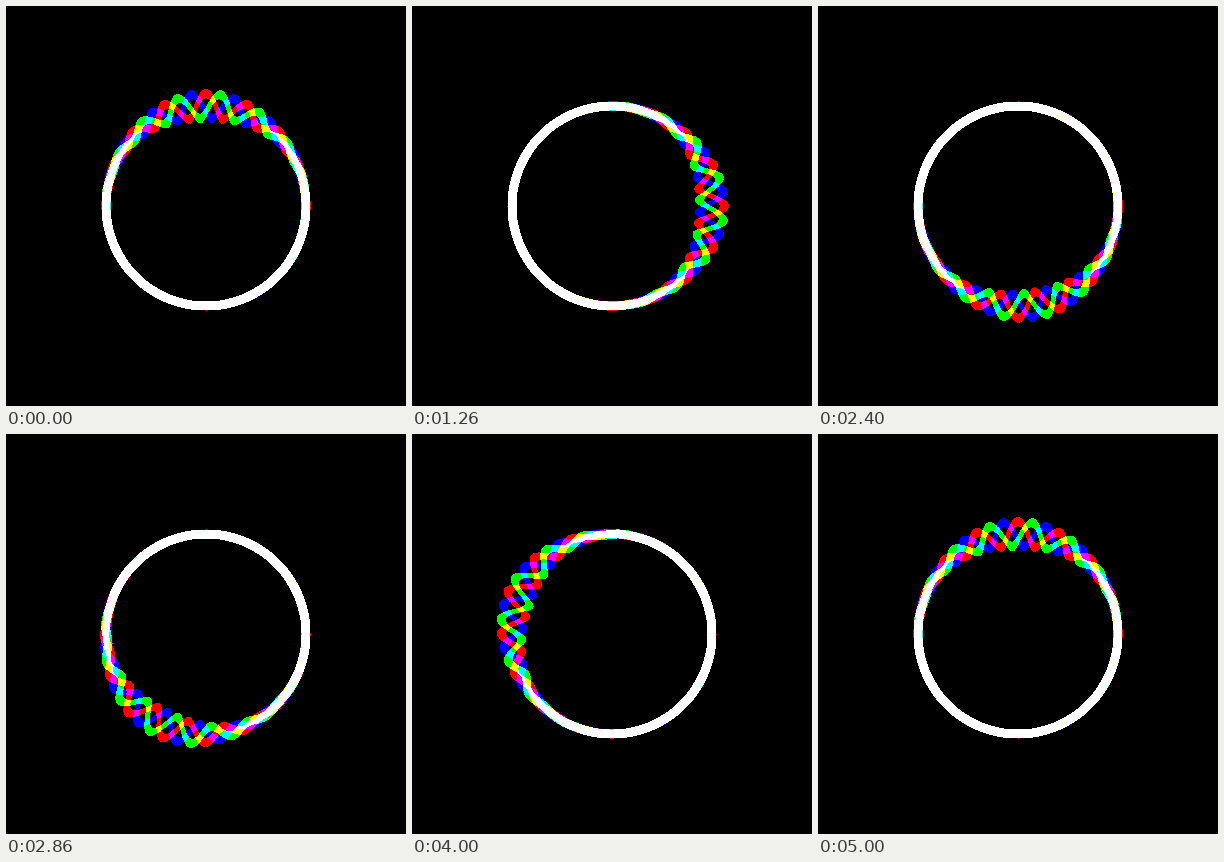
Animation of 400x400 px, one loop 5020 ms. Source, as an HTML page with a canvas:

```html
<!DOCTYPE html>
<html lang="en">
<head>
<meta charset="utf-8">
<title>Braided ring</title>
<style>
  html, body { margin: 0; width: 100%; height: 100%; overflow: hidden; background: #000; }
  canvas { display: block; width: 400px; height: 400px; }
</style>
</head>
<body>
<canvas id="stage" width="400" height="400"></canvas>
<script>
const SIZE = 400, MID = 200;
const ctx = document.getElementById('stage').getContext('2d');
const img = ctx.createImageData(SIZE, SIZE);
const px = new Uint32Array(img.data.buffer);

const TAU = Math.PI * 2;
const STEP = 20, STEPS = 251;
const RADIUS = 100, HALF = 4, GRAIN = 0.5;
const SWING = 12.5, TIGHT = 1.87;
const WAVES = 16, RAYS = 2400;
const BLACK = 0xff000000;
const CHANNELS = [0x0000ff, 0x00ff00, 0xff0000]; // red, green, blue in ABGR order

// Strength of the ripple at an angle away from its centre
function ripple(angle) {
  const d = Math.atan2(Math.sin(angle), Math.cos(angle));
  return SWING * Math.exp(-TIGHT * d * d);
}

// Light one channel along a ray, from the inner to the outer edge of the band
function ray(sin, cos, r, channel) {
  for (let w = -HALF; w <= HALF; w += GRAIN) {
    const x = Math.floor(MID + (r + w) * sin);
    const y = Math.floor(MID - (r + w) * cos);
    px[y * SIZE + x] |= channel;
  }
}

function draw(step) {
  const center = step / (STEPS - 1) * TAU;
  px.fill(BLACK);
  for (let i = 0; i < RAYS; i++) {
    const a = i / RAYS * TAU;
    const sin = Math.sin(a), cos = Math.cos(a);
    const swing = ripple(a - center);
    CHANNELS.forEach((channel, k) => {
      const wave = Math.cos(WAVES * a - k * TAU / 3);
      ray(sin, cos, RADIUS + swing * wave, channel);
    });
  }
  ctx.putImageData(img, 0, 0);
}

const start = performance.now();
let last = -1;

function tick() {
  const step = Math.floor((performance.now() - start) / STEP) % STEPS;
  if (step !== last) draw(last = step);
  requestAnimationFrame(tick);
}
tick();
</script>
</body>
</html>
```
